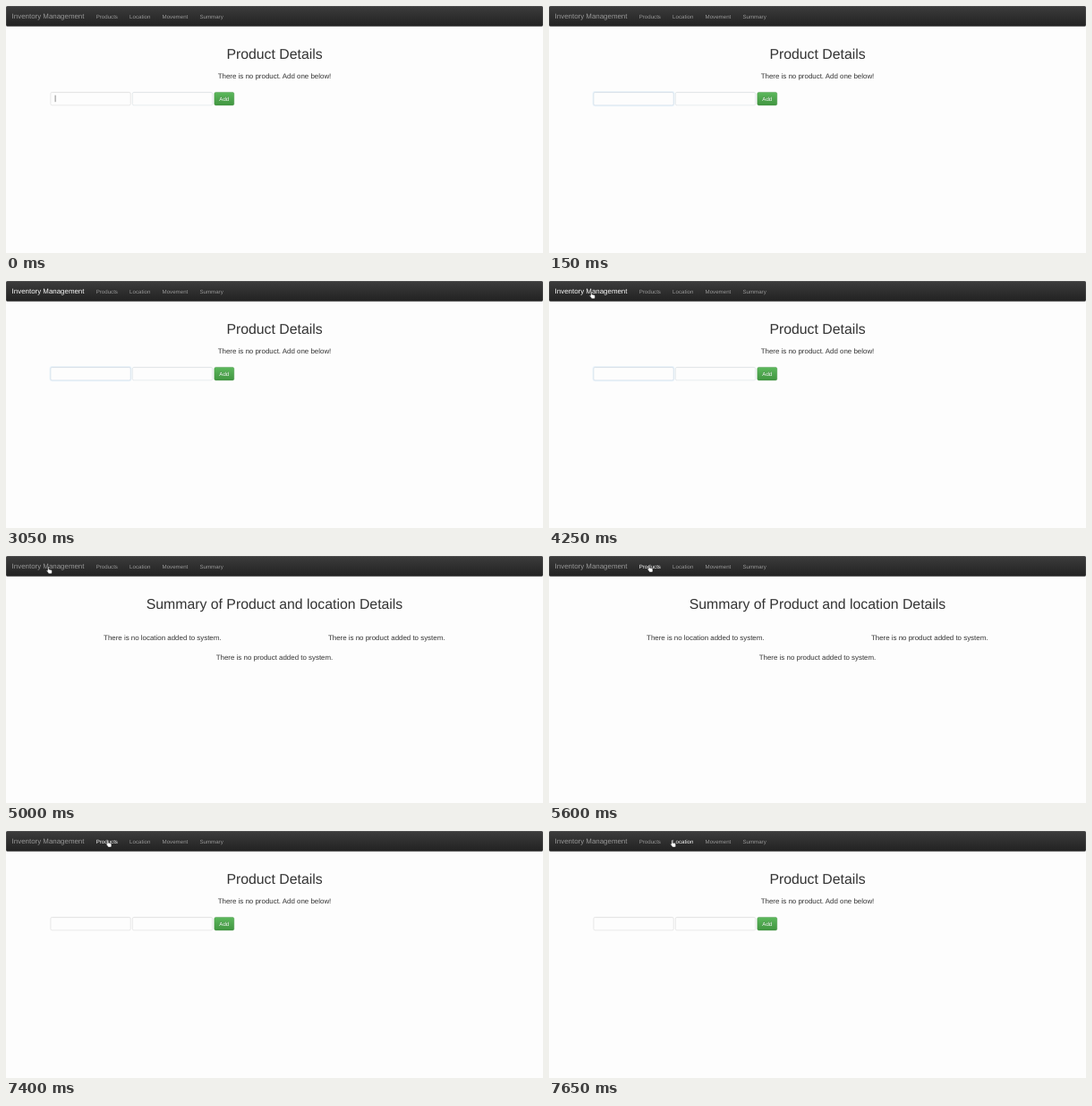
Recreate the animation shown at these times as an HTML page. Size 600 px wide and 276 px high, loop 8000 ms.

```html
<!DOCTYPE html>
<html lang="en">
<head>
<meta charset="utf-8">
<title>Inventory Management</title>
<style>
html, body { margin: 0; width: 100%; height: 100%; overflow: hidden; background: #fdfdfd; }
svg { display: block; width: 100%; height: 100%; }
text { font-family: "Liberation Sans", Arial, sans-serif; font-size: 14px; fill: #333; text-rendering: geometricPrecision; }
.mid { text-anchor: middle; }
.h1 { font-size: 36px; }
.h4 { font-size: 18px; }
.nav text { fill: #9d9d9d; text-shadow: 0 -1px 0 rgba(0, 0, 0, .25); }
.nav text.on { fill: #fff; }
.btn { fill: #fff; text-shadow: 0 -1px 0 rgba(0, 0, 0, .2); }
.field { fill: #fdfdfd; stroke: #ccc; }
</style>
</head>
<body>
<svg viewBox="0 0 1366 628.36" preserveAspectRatio="none">
  <defs>
    <linearGradient id="dark" x2="0" y2="1"><stop stop-color="#3c3c3c"/><stop offset="1" stop-color="#222"/></linearGradient>
    <linearGradient id="green" x2="0" y2="1"><stop stop-color="#5cb85c"/><stop offset="1" stop-color="#419641"/></linearGradient>
  </defs>
  <rect width="1366" height="628.36" fill="#fdfdfd"/>

  <g class="nav">
    <rect x=".5" y=".5" width="1365" height="51" rx="3.5" fill="url(#dark)" stroke="#080808"/>
    <text id="brand" class="h4" x="15" y="32.2">Inventory Management</text>
    <text id="products" x="229.2" y="30.9">Products</text>
    <text id="location" x="314.4" y="30.9">Location</text>
    <text x="397.4" y="30.9">Movement</text>
    <text x="492.7" y="30.9">Summary</text>
  </g>

  <g id="productPage">
    <text class="mid h1" x="683" y="133.5">Product Details</text>
    <text class="mid h4" x="683" y="185">There is no product. Add one below!</text>
    <rect id="glow" x="112" y="218" width="206.4" height="36" rx="5" fill="none" stroke="#66afe9" stroke-width="3"/>
    <rect id="name" class="field" x="113.5" y="219.5" width="203.4" height="33" rx="3.5"/>
    <rect id="amount" class="field" x="321.8" y="219.5" width="203.4" height="33" rx="3.5"/>
    <path d="M116 220.5H315M324 220.5H523" stroke="#000" stroke-opacity=".075"/>
    <path id="caret" d="M125.5 227V244" stroke="#444" stroke-width="1.4"/>
    <rect x="530.1" y="219.5" width="49.9" height="33" rx="3.5" fill="url(#green)" stroke="#3e8f3e"/>
    <text class="mid btn" x="555" y="240.9">Add</text>
  </g>

  <g id="summaryPage">
    <text class="mid h1" x="683" y="133.5">Summary of Product and location Details</text>
    <text class="mid h4" x="398" y="214.6">There is no location added to system.</text>
    <text class="mid h4" x="968" y="214.6">There is no product added to system.</text>
    <text class="mid h4" x="683" y="263.8">There is no product added to system.</text>
  </g>

  <path id="hand" fill="#fff" stroke="#111" d="M4 11V2.5a1.5 1.5 0 0 1 3 0V8l6 1.5q2 .5 2 2.5v3q0 2-1 4H6.5q-1-2-3-4.5L.8 11.5q1-1.6 3.2-.5z"/>
</svg>
<script>
const LOOP = 8000, TICK = 50;
const $ = id => document.getElementById(id);
const show = (id, on) => $(id).setAttribute('visibility', on ? 'visible' : 'hidden');
const within = (t, a, b) => t >= a && t < b;
const mix = (a, b, p) => a + (b - a) * p;
const ramp = (t, a, b) => Math.min(1, Math.max(0, (t - a) / (b - a)));
const ease = p => p * p * (3 - 2 * p);

// Right edge of each hover area in the bar
const links = [['brand', 214], ['products', 299], ['location', 382]];

function hovered(t, tip) {
  if (within(t, 2100, 2200) || within(t, 3050, 3450) || within(t, 3850, 5000)) return 'brand';
  if (within(t, 5300, 6400) || t >= 7400) return links.find(l => tip < l[1])[0];
}

function draw(ms) {
  const t = Math.floor(ms / TICK) * TICK;

  const summary = within(t, 5000, 6400);
  show('summaryPage', summary);
  show('productPage', !summary);

  // The first field gains its focus tint just after the start
  const first = t < 5000;
  const focus = first ? ramp(t, 0, 150) : 0;
  show('caret', t < 50);
  $('glow').setAttribute('stroke-opacity', 0.1 * focus);
  $('name').style.stroke = `rgb(${mix(204, 176, focus)},${mix(204, 200, focus)},${mix(204, 218, focus)})`;
  $('amount').style.stroke = first ? '#c8d2d8' : '#ccc';

  const toProducts = ease(ramp(t, 5250, 5600));
  const toLocation = ease(ramp(t, 7350, 7650));
  const x = mix(mix(102, 249, toProducts), 307.5, toLocation);
  const y = mix(26, 22, toProducts);
  show('hand', t >= 4250);
  $('hand').setAttribute('transform', `translate(${x} ${y})`);

  const hot = hovered(t, x + 5.5);
  for (const [id] of links) $(id).classList.toggle('on', id === hot);
}

const start = performance.now();
function frame() {
  draw((performance.now() - start) % LOOP);
  requestAnimationFrame(frame);
}
frame();
</script>
</body>
</html>
```
